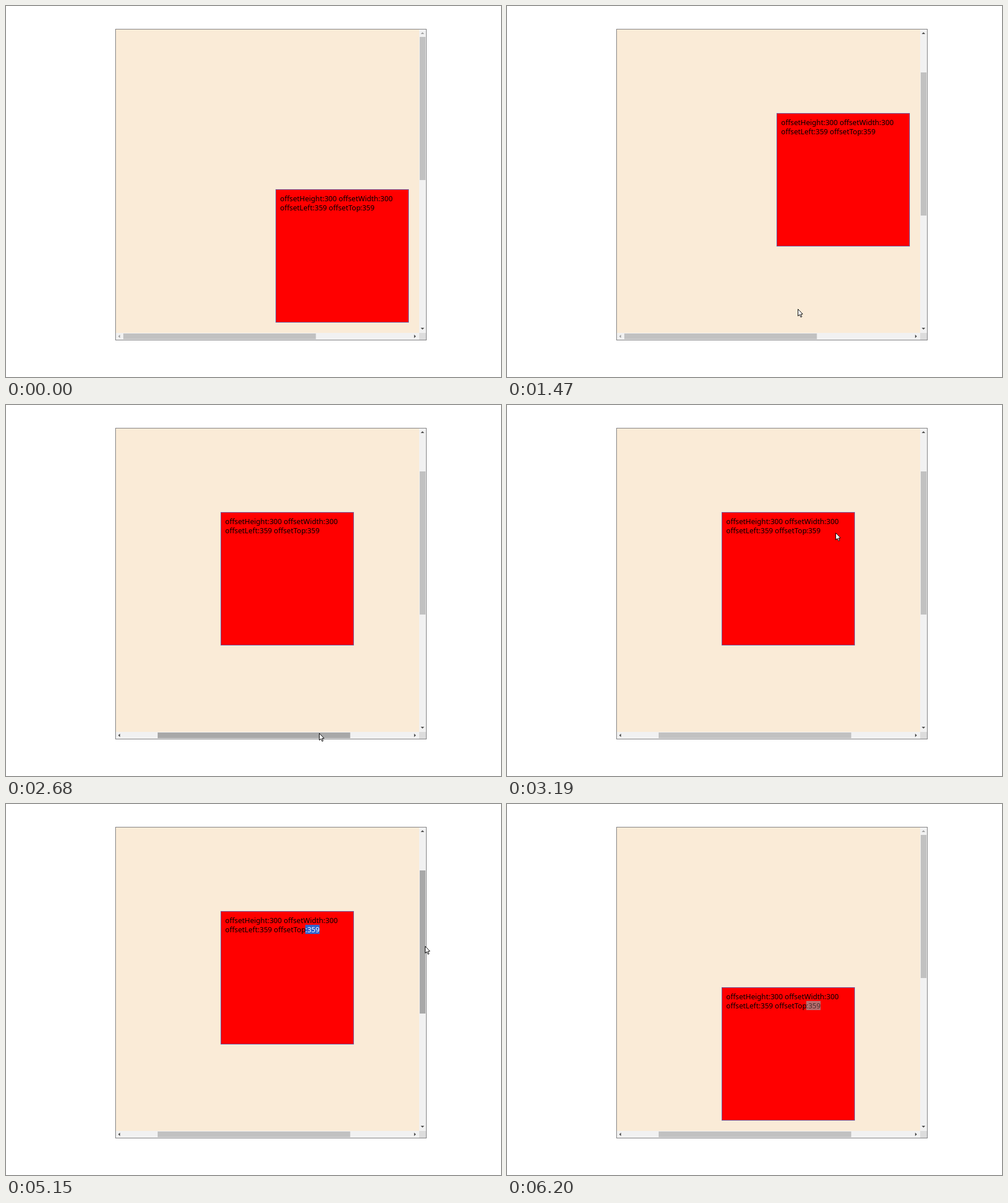
An HTML page with a canvas for the animation above (6350 ms loop, 865 px wide and 648 px high).

```html
<!DOCTYPE html>
<html lang="en">
<head>
<meta charset="utf-8">
<title>Scroll container offsets</title>
<style>
html, body { margin: 0; width: 100%; height: 100%; overflow: hidden; background: #fff; }
canvas { display: block; }
</style>
</head>
<body>
<canvas id="stage" width="865" height="648"></canvas>
<script>
const ctx = document.getElementById('stage').getContext('2d');
const LOOP = 6350, ENTER = 110, LEAVE = 5950, BLUR = 6200;
const FONT = '12.65px "Noto Sans", "Open Sans", sans-serif';
const PRESS_MARGIN = 50;
// Content pixels moved per pixel of scroll thumb
const RATIO_X = 1.6, RATIO_Y = 2.145;

// The user's gestures; a drag also scrolls or selects
const START = { x: 806, y: 613 };
const MOVES = [
  { from: 110, to: 440, x: 725, y: 223 },
  { from: 845, to: 1150, x: 725, y: 285, drag: 'vertical' },
  { from: 1200, to: 1620, x: 477, y: 564 },
  { from: 1640, to: 2070, x: 487, y: 573 },
  { from: 2250, to: 2620, x: 547, y: 573, drag: 'horizontal' },
  { from: 2740, to: 3040, x: 598, y: 330 },
  { from: 3040, to: 3190, x: 574, y: 223 },
  { from: 3250, to: 3930, x: 523, y: 217 },
  { from: 4200, to: 4400, x: 550, y: 219, drag: 'text' },
  { from: 4460, to: 4850, x: 732, y: 248 },
  { from: 5250, to: 5500, x: 732, y: 186, drag: 'vertical' },
  { from: 5550, to: 5740, x: 844, y: 563 },
  { from: 5750, to: LEAVE, x: 836, y: 650 }
];

const smooth = u => u * u * (3 - 2 * u);
const easeOut = u => 1 - (1 - u) ** 2;

function stateAt(t) {
  const s = { ...START, dx: 0, dy: 0, picked: 0, drag: null };
  for (const m of MOVES) {
    const u = Math.min(1, Math.max(0, (t - m.from) / (m.to - m.from)));
    const k = m.drag ? smooth(u) : easeOut(u);
    if (m.drag && t >= m.from - PRESS_MARGIN && t < m.to + PRESS_MARGIN) s.drag = m.drag;
    if (t < m.from) break;
    const stepX = (m.x - s.x) * k, stepY = (m.y - s.y) * k;
    if (m.drag === 'vertical') s.dy += stepY;
    if (m.drag === 'horizontal') s.dx += stepX;
    if (m.drag === 'text') s.picked = Math.round(4 * k);
    s.x += stepX;
    s.y += stepY;
    if (u < 1) break;
  }
  for (const key of ['x', 'y', 'dx', 'dy']) s[key] = Math.round(s[key]);
  return s;
}

function rect(color, x, y, w, h) {
  ctx.fillStyle = color;
  ctx.fillRect(x, y, w, h);
}

function frame(color, x, y, size) {
  ctx.strokeStyle = color;
  ctx.lineWidth = 1;
  ctx.strokeRect(x + 0.5, y + 0.5, size - 1, size - 1);
}

function polygon(points) {
  ctx.beginPath();
  points.forEach(([x, y]) => ctx.lineTo(x, y));
  ctx.closePath();
}

function scrollArrow(x, y, turns, enabled) {
  ctx.save();
  ctx.translate(x, y);
  ctx.rotate(turns * Math.PI / 2);
  polygon([[-3.1, 1.6], [0, -1.7], [3.1, 1.6]]);
  ctx.fillStyle = enabled ? '#505050' : '#a3a3a3';
  ctx.fill();
  ctx.restore();
}

function thumb(s, name, x, y, w, h) {
  const hover = !s.drag && s.x >= x - 1 && s.x <= x + w && s.y >= y - 1 && s.y <= y + h;
  rect(s.drag === name ? '#787878' : hover ? '#a8a8a8' : '#c1c1c1', x, y, w, h);
}

function drawContainer(s) {
  rect('#faebd7', 192, 41, 530, 530);
  rect('#f1f1f1', 722, 41, 12, 530);
  rect('#f1f1f1', 192, 571, 530, 12);
  rect('#dcdcdc', 722, 571, 12, 12);
  thumb(s, 'vertical', 723, 54 + s.dy, 10, 250);
  thumb(s, 'horizontal', 205 + s.dx, 572, 336.5, 10);
  scrollArrow(727.8, 47.5, 0, s.dy > 0);
  scrollArrow(727.8, 563.5, 2, true);
  scrollArrow(197.7, 577, 3, s.dx > 0);
  scrollArrow(714.7, 577, 1, true);
  frame('#7c7c7e', 191, 40, 544);
}

function drawBox(s, focused) {
  const x = 471 - Math.round(s.dx * RATIO_X), y = 320 - Math.round(s.dy * RATIO_Y);
  rect('#f00', x, y, 233, 233);
  frame('#6a68b0', x, y, 233);
  const label = (text, color, left, line) => {
    ctx.fillStyle = color;
    ctx.fillText(text, left, y + 21 + line * 16);
  };
  const tail = ':359', tailX = x + 148;
  const picked = tail.slice(0, s.picked);
  ctx.font = FONT;
  const width = ctx.measureText(picked).width;
  label('offsetHeight:300 offsetWidth:300', '#000', x + 8, 0);
  label('offsetLeft:359 offsetTop', '#000', x + 8, 1);
  if (picked) rect(focused ? '#2f62cf' : '#b86e6e', tailX, y + 24, Math.round(width), 16);
  label(picked, focused ? '#fff' : '#4a2c2c', tailX, 1);
  label(tail.slice(s.picked), '#000', tailX + width, 1);
}

function drawPointer(s, beam) {
  if (s.drag) {
    ctx.beginPath();
    ctx.arc(s.x, s.y, 10, 0, Math.PI * 2);
    ctx.fillStyle = 'rgba(244, 238, 0, 0.6)';
    ctx.fill();
  }
  ctx.save();
  ctx.translate(s.x, s.y);
  if (beam) {
    rect('#000', -0.5, -7, 1, 14);
    rect('#000', -3, -7.5, 6, 1);
    rect('#000', -3, 6.5, 6, 1);
  } else {
    ctx.translate(0.5, 0.5);
    polygon([[0, 0], [0, 12], [2.8, 9.5], [4.9, 14], [6.7, 13.2], [4.8, 8.8], [8.3, 8.6]]);
    ctx.fillStyle = '#fff';
    ctx.fill();
    ctx.lineWidth = 1;
    ctx.strokeStyle = '#000';
    ctx.stroke();
  }
  ctx.restore();
}

function draw(t) {
  const s = stateAt(t);
  rect('#fff', 0, 0, 865, 648);
  drawContainer(s);
  drawBox(s, t < BLUR);
  const overText = s.dx > 0 && s.x < 549 && s.y > 207 && s.y < 228;
  if (t >= ENTER && t < LEAVE) drawPointer(s, overText || s.drag === 'text');
}

const origin = performance.now();
function tick() {
  draw((performance.now() - origin) % LOOP);
  requestAnimationFrame(tick);
}
tick();
</script>
</body>
</html>
```
